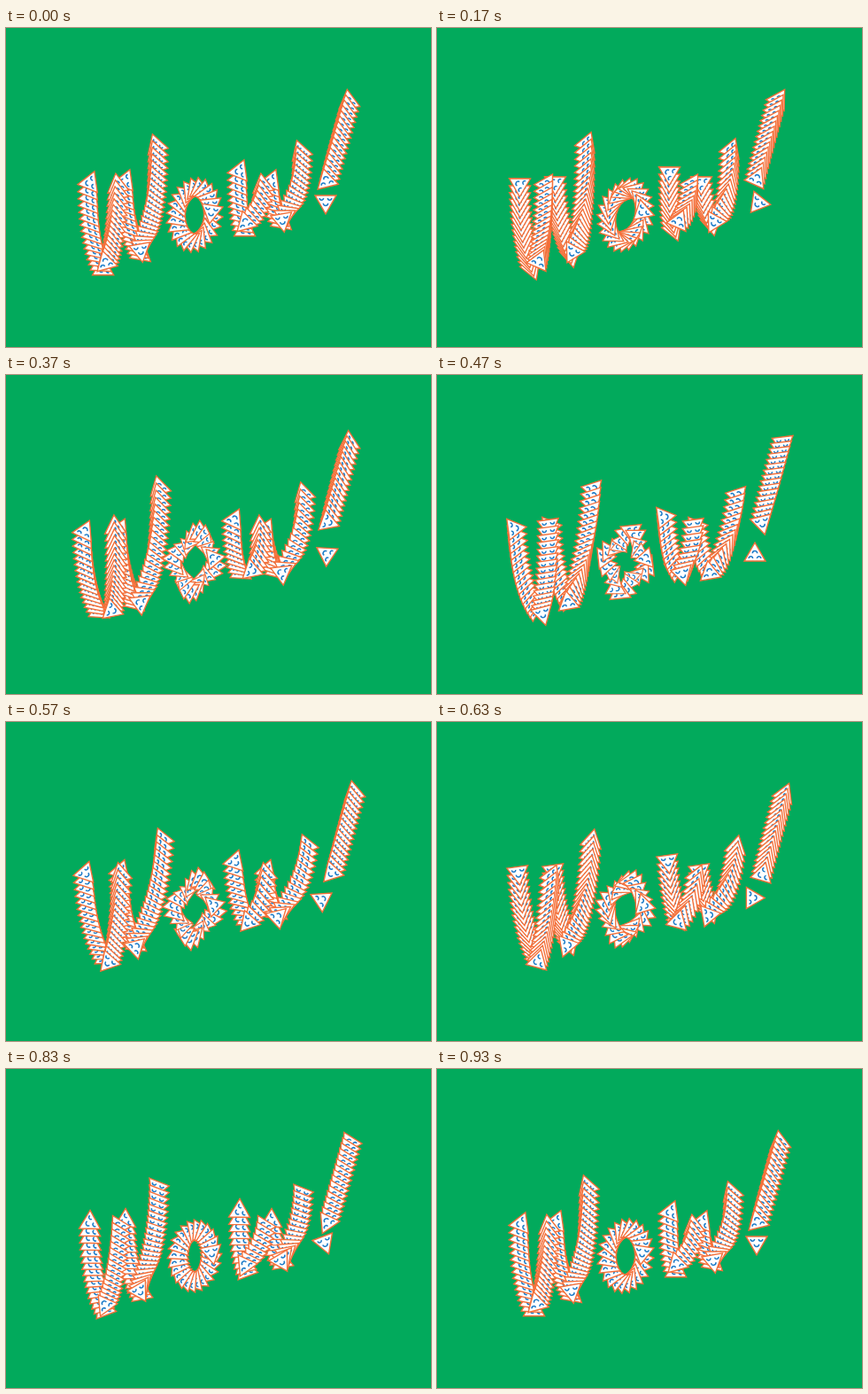
An HTML page with a canvas for the animation above (1.81 s loop, 480x360 px).

```html
<!DOCTYPE html>
<html>
<head>
<meta charset="utf-8">
<style>
  html, body { margin: 0; width: 100%; height: 100%; overflow: hidden; background: #02aa5c; }
  canvas { display: block; }
</style>
</head>
<body>
<canvas id="stage" width="480" height="360"></canvas>
<script>
const ctx = document.getElementById('stage').getContext('2d');
const TAU = Math.PI * 2, RAD = Math.PI / 180;
const LOOP = 1810, STEPS = 28;
const ORBIT = 3.8;    // distance of each triangle from its pivot
const SPACING = 6.2;  // gap between triangles along a stroke

const mix = (a, b, k) => a + (b - a) * k;

function smile(x, y, r) {
  ctx.moveTo(x + r, y);
  ctx.arc(x, y, r, 0, Math.PI);
}

function triangle(x, y, angle, scale = 1) {
  ctx.save();
  ctx.translate(x, y);
  ctx.rotate(angle);
  ctx.scale(scale, scale);

  ctx.beginPath();
  ctx.moveTo(-12, -6.9);
  ctx.lineTo(12, -6.9);
  ctx.lineTo(0, 13.9);
  ctx.closePath();
  ctx.fillStyle = '#fff';
  ctx.fill();
  ctx.strokeStyle = '#f4703a';
  ctx.lineWidth = 1.4;
  ctx.stroke();

  ctx.beginPath();
  smile(-4.6, -3.8, 2.2);
  smile(4.6, -3.8, 2.2);
  smile(0, 2, 2.7);
  ctx.strokeStyle = '#1d7cc9';
  ctx.lineWidth = 1.5;
  ctx.stroke();
  ctx.restore();
}

// Rotation and orbit angle at the top and at the bottom of a stroke
const down  = { spin: [82, 60], orbit: [10, 80], bend: 1, topInFront: true };
const inner = { spin: [82, 70], orbit: [10, 10], bend: 1, topInFront: true };
const rise  = { spin: [172, 165], orbit: [93, -147], bend: 1 };
const tail  = { spin: [42, -10], orbit: [150, -60], bend: 1 };
const shaft = { spin: [173, 166], orbit: [122, 130], bend: 0 };
const dot   = { spin: [0, 0], orbit: [-75, -75], bend: 0 };

function stroke(turn, pose, x0, y0, x1, y1) {
  const steps = Math.round(Math.hypot(x1 - x0, y1 - y0) / SPACING);
  const [from, to] = pose.orbit.map(a => a * RAD + turn);
  for (let i = 0; i <= steps; i++) {
    const k = steps ? (pose.topInFront ? steps - i : i) / steps : 0;
    // steep at the top, hooking sideways at the bottom
    const hook = pose.bend * 2 * k * (1 - k);
    const x = mix(x0, x1, k - 0.4 * hook);
    const y = mix(y0, y1, k + 0.15 * hook);
    triangle(
      x + ORBIT * mix(Math.cos(from), Math.cos(to), k),
      y + ORBIT * mix(Math.sin(from), Math.sin(to), k),
      mix(...pose.spin, k ** 3) * RAD + turn
    );
  }
}

// The ring bulges at four key triangles halfway through the turn
function ring(turn, cx, cy) {
  const count = 24, tilt = 11 * RAD;
  const pull = (1 - Math.cos(turn)) / 2;
  for (let i = 0; i < count; i++) {
    const a = i / count * TAU;
    const size = 1 - 0.22 * pull * Math.sin(2 * a) ** 2;
    const bulge = 6 * pull * Math.cos(2 * a) ** 2;
    const x = (18.5 * size + bulge) * Math.cos(a);
    const y = (29 * size + bulge) * Math.sin(a);
    triangle(
      cx + x * Math.cos(tilt) - y * Math.sin(tilt),
      cy + x * Math.sin(tilt) + y * Math.cos(tilt),
      a - 0.2 * pull * Math.sin(4 * a) + 24 * RAD + turn,
      size
    );
  }
}

function word(turn) {
  stroke(turn, inner, 131, 172, 149, 254);
  stroke(turn, down, 91, 174, 109, 268);
  stroke(turn, rise, 126, 174, 116, 267);
  stroke(turn, tail, 173, 131, 150, 254);

  ring(turn, 213, 211);

  stroke(turn, inner, 296, 172, 308, 218);
  stroke(turn, down, 260, 161, 269, 224);
  stroke(turn, rise, 290, 174, 274, 222);
  stroke(turn, tail, 336, 138, 310, 220);

  stroke(turn, shaft, 389, 80, 364.5, 169.5);
  stroke(turn, dot, 360, 199.5, 360, 199.5);
}

function frame(now) {
  const step = Math.min(STEPS, Math.floor((now % LOOP + 7) * 0.03));
  const u = step / STEPS;
  ctx.fillStyle = '#02aa5c';
  ctx.fillRect(0, 0, 480, 360);
  word(TAU * u - Math.sin(TAU * u) / 2);  // one soft full turn
  requestAnimationFrame(frame);
}
requestAnimationFrame(frame);
</script>
</body>
</html>
```
